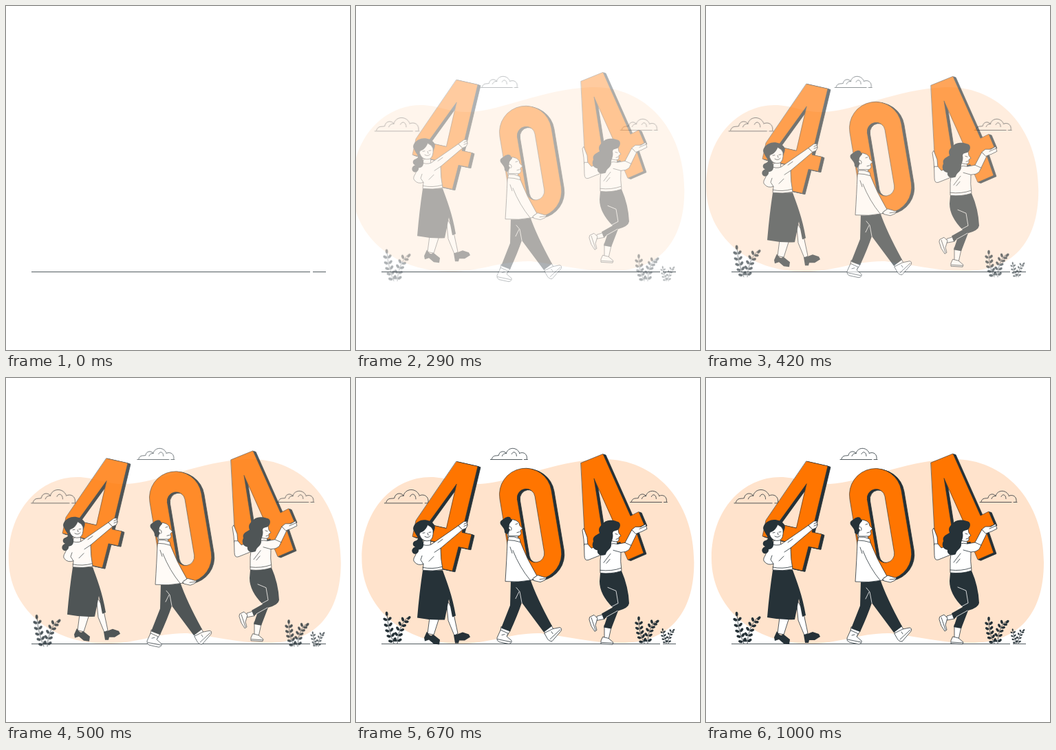
Write an HTML page that moves like this. It is 500 px wide and 500 px high and loops after 1040 ms.

```html
<!DOCTYPE html>
<html lang="en">
<head>
<meta charset="utf-8">
<title>404</title>
<style>
html, body { margin: 0; width: 100%; height: 100%; overflow: hidden; background: #fff; }
svg { display: block; width: 100vw; height: 100vh; }
path, ellipse { stroke-linecap: round; stroke-linejoin: round; }
.dark { fill: #263238; }
.white { fill: #fff; stroke: #263238; stroke-width: .8; }
.line { fill: none; stroke: #263238; stroke-width: .8; }
.crease { fill: none; stroke: #fff; stroke-width: .8; }
.face { fill: #ff7500; fill-rule: evenodd; stroke: #263238; stroke-width: .6; }
.side { fill: #263238; fill-rule: evenodd; stroke: #263238; stroke-width: .8; }
</style>
</head>
<body>
<svg viewBox="0 0 500 500">
  <defs>
    <path id="left4" d="M146 121L177 128L154 224L168 227L163 248L149 245L140 280L117 275L125 240L82 230L87 207ZM146 154L104 212L131 218Z"/>
    <path id="right4" d="M327 123L359 110L399 200L411 194L419 213L406 219L418 254L395 264L384 238L337 250L332 222ZM346 146L357 216L374 209Z"/>
    <path id="zero" transform="rotate(-9.5 253.5 212)" d="M215.500 169a37 37 0 0 1 76 0v87a37 37 0 0 1-76 0ZM240.500 174v82a13 13 0 0 0 26 0v-82a13 13 0 0 0-26 0Z"/>
    <g id="cloud" class="line">
      <path vector-effect="non-scaling-stroke" d="M0 17H46M49 17H54M2 16C4 10 8 12 12 11C13 4 21 4 23 8M23 8C25-1 38-2 42 7M42 8C48 5 54 9 53 16M17 12C18 9 20 8 23 8M31 9C33 4 38 6 38 12"/>
    </g>
  </defs>

  <g class="move" data-dx="-22">
    <path fill="#ffe3cc" d="M108 144C132 144 150 155 180 154C225 152 285 121 355 118C429 115 491 173 491 268C491 345 452 385 385 385C345 386 310 376 268 371C225 370 195 386 150 386C70 386 8 335 8 262C8 190 55 144 108 144Z"/>
  </g>
  <path d="M37 386.500H442M446 386.500H465" fill="none" stroke="#263238" stroke-width=".8" style="stroke-linecap:butt"/>

  <g class="move" data-dx="-22">
    <use href="#cloud" transform="translate(41 161.500) scale(1.200)"/>
    <use href="#cloud" transform="translate(195 101.500)"/>
    <use href="#cloud" transform="translate(398 163.500)"/>
  </g>
  <g class="move dark" data-dy="22" id="plants"></g>

  <!-- woman with the first digit -->
  <g class="move" data-dy="-22">
    <g class="digit" data-shape="left4"></g>
    <path class="white" d="M107 348L104 371L113 373L121 348ZM131 320L134 352L143 374L148 371L141 338Z"/>
    <path class="dark" d="M103 368L99 377L100 382L106 380L113 386L121 387L122 380L112 372L110 374Q106 374 103 368Z"/>
    <path class="dark" d="M142 373L144 385L149 385L150 381L158 381L166 376L164 372L155 369L147 372Z"/>
    <path class="dark" d="M97 279L126 279C132 296 140 315 145 345L140 347L135 321L129 351Q109 352 89 348Q92 312 97 279Z"/>
    <path class="white" d="M98 237L97 245L109 244L108 234Z"/>
    <path class="white" d="M97 242Q107 245 113 239L149 214L155 220L123 247Q123 263 126 278Q112 281 97 279L98 270Q90 273 85 267Q82 264 86 258Q91 246 97 242Z"/>
    <path class="line" d="M98 270L94 264L96 258M119 239L126 234M123 247L114 253M97 275Q111 278 125 274M106 266L113 259"/>
    <path class="white" d="M149 214L157 208L161 208L162 214L160 218L155 220Z"/>
    <path class="line" d="M157 212L161 210M157 215L162 213"/>
    <path class="dark" d="M84 221C81 217 86 210 91 208C97 204 109 206 113 212C117 216 113 222 112 226L97 236C100 243 97 249 91 249C92 254 85 258 82 253C80 249 83 246 86 245C81 243 82 237 87 236C94 233 87 229 84 221Z"/>
    <path class="white" d="M93 224C98 223 102 219 104 213Q111 216 112 221Q113 233 107 236Q98 238 94 231Q91 227 93 224Z"/>
    <path class="line" d="M97 225l3-.5M106 224l3-.4M104 225l1 3M100 230Q105 233 108 229"/>
  </g>

  <!-- man with the middle digit -->
  <g class="move" data-dy="22">
    <g class="digit" data-shape="zero"></g>
    <path class="white" d="M211 362L209 373L219 376L224 368ZM272 366L278 377L290 371L284 360Z"/>
    <path class="white" d="M210 367L205 378Q204 382 208 384L222 387Q227 386 226 382L219 376L221 372Z"/>
    <path class="white" d="M274 371L286 365L296 363Q300 364 298 368L285 383Q280 383 278 379Z"/>
    <path class="line" d="M206 380L225 384M297 366L282 380M212 374l4-1M284 369l2 3"/>
    <path class="dark" d="M225 294L253 292Q262 319 285 361L273 370L241 327Q235 345 224 369L211 364L224 331Z"/>
    <path class="crease" d="M233 305L238 311L241 327M237 311L232 321"/>
    <path class="white" d="M219 224L221 234L236 235L235 227Z"/>
    <path class="white" d="M222 214Q223 206 228 206Q234 207 237 211L238 215L242 219L239 222L240 226Q239 231 233 230L222 230Z"/>
    <path class="dark" d="M210 213C208 207 214 207 216 204C221 201 225 202 225 205Q229 207 225 210L223 213L222 219L224 221L220 228L216 225Q216 220 213 217Z"/>
    <path class="white" d="M222 217a2.500 3 0 1 1 3 5"/>
    <path class="line" d="M232 213l3-1M234 225l4-1"/>
    <path class="white" d="M222 231Q230 230 238 234L239 239Q248 263 263 288L256 294Q236 298 217 296Q219 264 220 239Z"/>
    <path class="line" d="M221 236Q230 236 239 239M228 251Q238 276 253 294M224 246L227 255M258 291l5-3"/>
    <path class="white" d="M257 292L264 287L274 290L277 290L275 294L268 297L259 295Z"/>
    <path class="line" d="M267 293l8-1"/>
  </g>

  <!-- woman with the last digit -->
  <g class="move" data-dy="-22">
    <g class="digit" data-shape="right4"></g>
    <path class="white" d="M331 234L329 221L331 218L336 231L337 243L332 243Z"/>
    <path class="white" d="M332 241L337 241L342 247L353 243L358 256L338 264Q332 266 332 258Z"/>
    <path class="white" d="M360 343L350 346L350 352L361 350ZM361 359L361 379L367 380L371 362Z"/>
    <path class="white" d="M340 347L346 344L351 349L348 359L350 366L347 368Q341 361 339 351Z"/>
    <path class="white" d="M359 376L367 378L374 384L373 387L356 386L356 382Z"/>
    <path class="line" d="M342 348L348 366M357 384L373 385"/>
    <path class="dark" d="M355 283L386 280Q396 303 397 327Q396 334 381 338L371 364L360 362L365 347L360 350L357 342L373 333Q354 314 354 295Z"/>
    <path class="crease" d="M366 304L378 309L381 327L366 335M380 338L364 347"/>
    <path class="white" d="M366 232L366 246L380 245L379 234Z"/>
    <path class="white" d="M371 217L381 219L382 225L385 229L382 231L382 236Q378 239 371 236Z"/>
    <path class="line" d="M377 226l3 1M378 234l3-1"/>
    <path class="white" d="M357 247Q369 238 380 241L391 239L401 220L408 226L397 249Q393 253 385 253Q384 266 386 280Q371 285 355 283Q354 264 357 247Z"/>
    <path class="line" d="M385 253L374 250M391 239L400 243M360 268L370 255M364 269L369 263M355 279Q371 281 385 276"/>
    <path class="white" d="M401 220L406 216L414 216L421 212L422 216L423 219L415 223L407 226Z"/>
    <path class="line" d="M412 219L421 215"/>
    <path class="dark" d="M359 211C364 205 375 206 379 208C385 209 385 215 382 219C378 223 374 220 373 225C375 233 370 237 371 243C370 249 364 250 363 256C355 260 350 255 351 250C344 249 342 242 345 237C343 230 349 228 354 225C351 217 356 214 359 211Z"/>
  </g>
</svg>
<script>
const NS = 'http://www.w3.org/2000/svg';
const add = (parent, tag, attrs) => {
  const node = document.createElementNS(NS, tag);
  for (const key in attrs) node.setAttribute(key, attrs[key]);
  return parent.appendChild(node);
};

// Each digit is a front face over dark copies pushed to the right
for (const group of document.querySelectorAll('.digit')) {
  const href = '#' + group.dataset.shape;
  for (const depth of [4, 2.7, 1.4]) {
    add(group, 'use', { href, class: 'side', transform: `translate(${depth} ${depth * 0.35})` });
  }
  add(group, 'use', { href, class: 'face' });
}

// A curved stem with pairs of leaves
const plants = document.getElementById('plants');
function stem(x0, y0, cx, cy, x1, y1, pairs, size) {
  add(plants, 'path', { d: `M${x0} ${y0}Q${cx} ${cy} ${x1} ${y1}`, class: 'line' });
  const leaf = (x, y, angle) => add(plants, 'ellipse', {
    cx: size + 1, rx: size, ry: size * 0.6,
    transform: `translate(${x} ${y}) rotate(${angle})`
  });
  for (let i = 0; i < pairs; i++) {
    const t = 0.05 + 0.75 * i / (pairs - 1), u = 1 - t;
    const x = u * u * x0 + 2 * u * t * cx + t * t * x1;
    const y = u * u * y0 + 2 * u * t * cy + t * t * y1;
    const dx = u * (cx - x0) + t * (x1 - cx);
    const dy = u * (cy - y0) + t * (y1 - cy);
    const angle = Math.atan2(dy, dx) * 180 / Math.PI;
    leaf(x, y, angle + 52);
    leaf(x, y, angle - 52);
  }
  leaf(x1, y1 + size, Math.atan2(y1 - cy, x1 - cx) * 180 / Math.PI);
}
stem(55, 386, 47, 368, 45, 344, 5, 3.2);
stem(60, 386, 61, 363, 74, 349, 5, 3.2);
stem(419, 386, 411, 372, 411, 351, 5, 3);
stem(424, 386, 424, 364, 435, 354, 5, 3);
stem(451, 386, 447, 378, 446, 367, 4, 1.8);
stem(454, 386, 454, 374, 460, 367, 4, 1.8);

const LOOP = 1040, FPS = 24, LEAD = 35;
const curve = (s, a, b) => 3 * s * (1 - s) ** 2 * a + 3 * s * s * (1 - s) * b + s ** 3;

// cubic-bezier(.36, -.01, .5, 1.38): overshoots, then settles
function ease(x) {
  if (x >= 1) return 1;
  let lo = 0, hi = 1;
  for (let i = 0; i < 30; i++) {
    const mid = (lo + hi) / 2;
    if (curve(mid, 0.36, 0.5) < x) lo = mid; else hi = mid;
  }
  return curve(lo, -0.01, 1.38);
}

const movers = [...document.querySelectorAll('.move')];
function draw(ms) {
  const step = Math.floor((ms % LOOP + 5) * FPS / 1000);
  const p = step < 2 ? 0 : ease((step * 1000 / FPS + LEAD) / 1000);
  for (const node of movers) {
    const { dx = 0, dy = 0 } = node.dataset;
    node.setAttribute('transform', `translate(${dx * (1 - p)} ${dy * (1 - p)})`);
    node.setAttribute('opacity', Math.min(1, Math.max(0, p)));
  }
}

let start;
function tick(now) {
  start ??= now;
  draw(now - start);
  requestAnimationFrame(tick);
}
draw(0);
requestAnimationFrame(tick);
</script>
</body>
</html>
```
